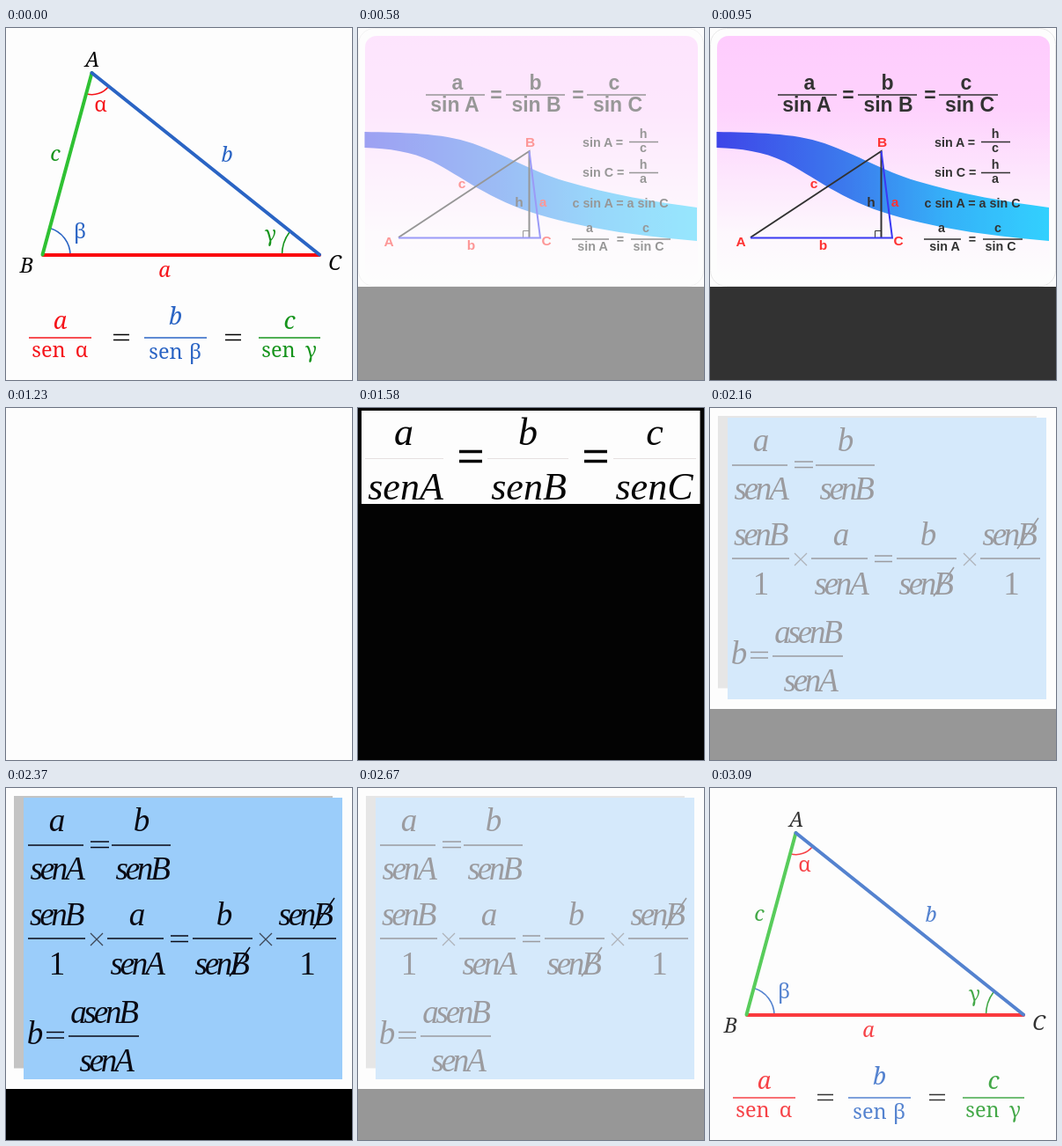
These frames come from a looping animation (393 px wide and 400 px high, 3160 ms). An HTML page:

```html
<!DOCTYPE html>
<html lang="es">
<head>
<meta charset="utf-8">
<title>Law of sines</title>
<style>
  html, body { margin: 0; width: 100%; height: 100%; overflow: hidden; background: #fdfdfd; }
  .slide {
    position: absolute; left: 0; top: 0; width: 393px; height: 400px;
    animation: fade 3160ms step-end infinite;
    animation-delay: calc(790ms * var(--i) - 3160ms);
  }
  /* 160 ms hold, then 70 ms steps down to white and up to the next slide */
  @keyframes fade {
    0% { opacity: 1; }
    5.063% { opacity: .8; }
    7.278% { opacity: .6; }
    9.493% { opacity: .4; }
    11.708% { opacity: .2; }
    13.924% { opacity: 0; }
    91.139% { opacity: .2; }
    93.354% { opacity: .4; }
    95.569% { opacity: .6; }
    97.784% { opacity: .8; }
    100% { opacity: 1; }
  }
  text { text-anchor: middle; }
  path { fill: none; }
  .left text, text.left { text-anchor: start; }

  .angles { font: 23.5px "Noto Serif", serif; }
  .angles .it { font-style: italic; }
  .angles .big { font-style: italic; font-size: 27px; }
  .red { fill: #f5141a; stroke: #f5141a; }
  .blue { fill: #2a64c4; stroke: #2a64c4; }
  .green { fill: #16941c; stroke: #16941c; }
  .angles text { stroke: none; }
  .angles path { fill: none; stroke-width: 1.6; }
  .angles .side { stroke-width: 4; stroke-linecap: round; }

  .height { font: bold 14.3px "Liberation Sans", Arial, sans-serif; }
  .height .big { font-size: 23px; }
  .height .label { font-size: 15.5px; fill: #f00; }

  .ratio { font: italic 44px "Liberation Serif", Times, serif; }

  .steps { font: italic 37px "Liberation Serif", Times, serif; }
  .steps .word { letter-spacing: -3.2px; }
  .steps .num { font-style: normal; }
</style>
</head>
<body>

<svg class="slide angles" style="--i:0" viewBox="0 0 393 400">
  <path class="red" d="M92 75A24 24 0 0 0 116.500 66.500"/>
  <path class="blue" d="M50 227.500A32 32 0 0 1 73 258"/>
  <path class="green" d="M313.500 258A43 43 0 0 1 322 232"/>
  <path class="side" stroke="#fa0a0f" d="M42 258H356"/>
  <path class="side" stroke="#2fc133" d="M41.500 257.500L97.500 51"/>
  <path class="side" stroke="#2a64c4" d="M97.500 51L356 257.500"/>
  <g class="it">
    <text x="98" y="44">A</text>
    <text x="23.500" y="278">B</text>
    <text x="373.500" y="275">C</text>
    <text class="red" x="180" y="283">a</text>
    <text class="blue" x="251" y="152">b</text>
    <text class="green" x="56" y="151">c</text>
  </g>
  <text class="red" x="107.500" y="95">α</text>
  <text class="blue" x="84" y="239">β</text>
  <text class="green" x="300.500" y="242">γ</text>

  <g class="red">
    <text class="big" x="61.500" y="342">a</text>
    <path d="M26 352H97"/>
    <text x="48.500" y="374">sen</text><text x="86" y="374">α</text>
  </g>
  <g class="blue">
    <text class="big" x="192.500" y="337">b</text>
    <path d="M157 352H228"/>
    <text x="181.500" y="376">sen</text><text x="215" y="376">β</text>
  </g>
  <g class="green">
    <text class="big" x="322" y="342">c</text>
    <path d="M287 352H357"/>
    <text x="309.500" y="374">sen</text><text x="346.500" y="374">γ</text>
  </g>
  <path stroke="#000" d="M122 348.500H140M122 354.500H140M249 348.500H267M249 354.500H267"/>
</svg>

<svg class="slide height" style="--i:1" viewBox="0 0 393 400">
  <defs>
    <linearGradient id="sky" x2="0" y2="1">
      <stop offset="0" stop-color="#ffc1fd"/>
      <stop offset=".3" stop-color="#ffc8fd"/>
      <stop offset=".8" stop-color="#fdf6fd"/>
      <stop offset="1" stop-color="#fdfdfd"/>
    </linearGradient>
    <linearGradient id="river">
      <stop offset="0" stop-color="#1018e4"/>
      <stop offset=".4" stop-color="#0c5cea"/>
      <stop offset=".7" stop-color="#04a0f8"/>
      <stop offset="1" stop-color="#00c6ff"/>
    </linearGradient>
  </defs>
  <rect y="294" width="393" height="106"/>
  <rect x=".5" y=".5" width="392" height="293" rx="18" fill="#fdfdfd" stroke="#e2e2e2"/>
  <rect x="8" y="9" width="378" height="278" rx="13" fill="url(#sky)"/>
  <path style="fill:url(#river)" d="M7.500 118C50 119 95 119 130 131C170 145 195 162 235 174C285 189 340 198 385 204V242C330 237 265 230 205 212C150 196 115 167 85 152C60 140 35 137 7.500 136Z"/>

  <g class="big">
    <text x="113" y="70">a</text><text x="110" y="95">sin A</text>
    <text x="157" y="84">=</text>
    <text x="201.500" y="70">b</text><text x="202.500" y="95">sin B</text>
    <text x="250" y="84">=</text>
    <text x="291" y="70">c</text><text x="295" y="95">sin C</text>
  </g>
  <path stroke="#000" stroke-width="1.500" d="M77 76H144M168 76H235M260 76H327M308 129.500H341M308 164.500H341M243 240H285M310 240H355"/>

  <text class="left" x="255" y="135">sin A =</text>
  <text x="324" y="125">h</text><text x="324" y="141">c</text>
  <text class="left" x="255" y="169">sin C =</text>
  <text x="324" y="160">h</text><text x="324" y="176">a</text>
  <text x="298" y="204">c sin A = a sin C</text>
  <text x="263" y="232">a</text><text x="266.500" y="253">sin A</text>
  <text x="298" y="245">=</text>
  <text x="327" y="232">c</text><text x="330" y="253">sin C</text>

  <path stroke="#000" d="M187.500 238V230.500H194"/>
  <path stroke="#000" stroke-width="2" d="M46 238L194.500 140V238"/>
  <path stroke="#0a0af0" stroke-width="2" d="M46 238.500H207L194.500 140"/>
  <text x="183" y="203" font-size="15.500">h</text>
  <g class="label">
    <text x="35" y="248">A</text>
    <text x="195.500" y="135">B</text>
    <text x="214" y="247">C</text>
    <text x="118" y="182">c</text>
    <text x="210" y="203">a</text>
    <text x="128.500" y="252">b</text>
  </g>
</svg>

<svg class="slide ratio" style="--i:2" viewBox="0 0 393 400">
  <rect width="393" height="400" fill="#030303"/>
  <rect x="4" y="3" width="384.500" height="106" fill="#fdfdfd"/>
  <path stroke="#e6e0e0" d="M8 57.500H97M147 57.500H239M290 57.500H384"/>
  <path stroke="#050505" stroke-width="3.500" d="M115 49.500H141M115 60.500H141M257 49.500H283M257 60.500H283"/>
  <g fill="#050505">
    <text x="52" y="42">a</text><text x="54" y="104">senA</text>
    <text x="193" y="42">b</text><text x="194" y="104">senB</text>
    <text x="337" y="42">c</text><text x="336.500" y="104">senC</text>
  </g>
</svg>

<svg class="slide steps" style="--i:3" viewBox="0 0 393 400">
  <rect y="342" width="393" height="58"/>
  <rect x="9" y="9" width="362" height="309.500" fill="#c4c4c4"/>
  <rect x="20" y="11" width="362" height="320" fill="#9bcdfa"/>
  <g fill="#0a0a14">
    <text x="58" y="49">a</text>
    <text x="154" y="49">b</text>
    <text x="149" y="156">a</text>
    <text x="248" y="156">b</text>
    <text x="33" y="291">b</text>
    <g class="word">
      <text x="57" y="104">senA</text>
      <text x="154" y="104">senB</text>
      <text x="56.500" y="156">senB</text>
      <text x="148" y="212">senA</text>
      <text x="244" y="212">senB</text>
      <text x="339" y="156">senB</text>
      <text x="110.500" y="267">asenB</text>
      <text x="113" y="322">senA</text>
    </g>
    <g class="num">
      <text x="58" y="212">1</text>
      <text x="342.500" y="212">1</text>
    </g>
  </g>
  <g stroke="#0a0a14" stroke-width="1.600">
    <path d="M25 65H88M120 65H187M25 171H90M115 171H179M212 171H280M307 171H375M71 282H151"/>
    <path d="M96 61H117M96 67.500H117M187 168H207M187 174.500H207M46 277.500H66M46 284H66"/>
    <path d="M254 214L277 181M349 160L373 125"/>
    <path stroke="#3c4656" stroke-width="1.300" d="M96 165L110 179M110 165L96 179M288 165L302 179M302 165L288 179"/>
  </g>
</svg>

</body>
</html>
```
